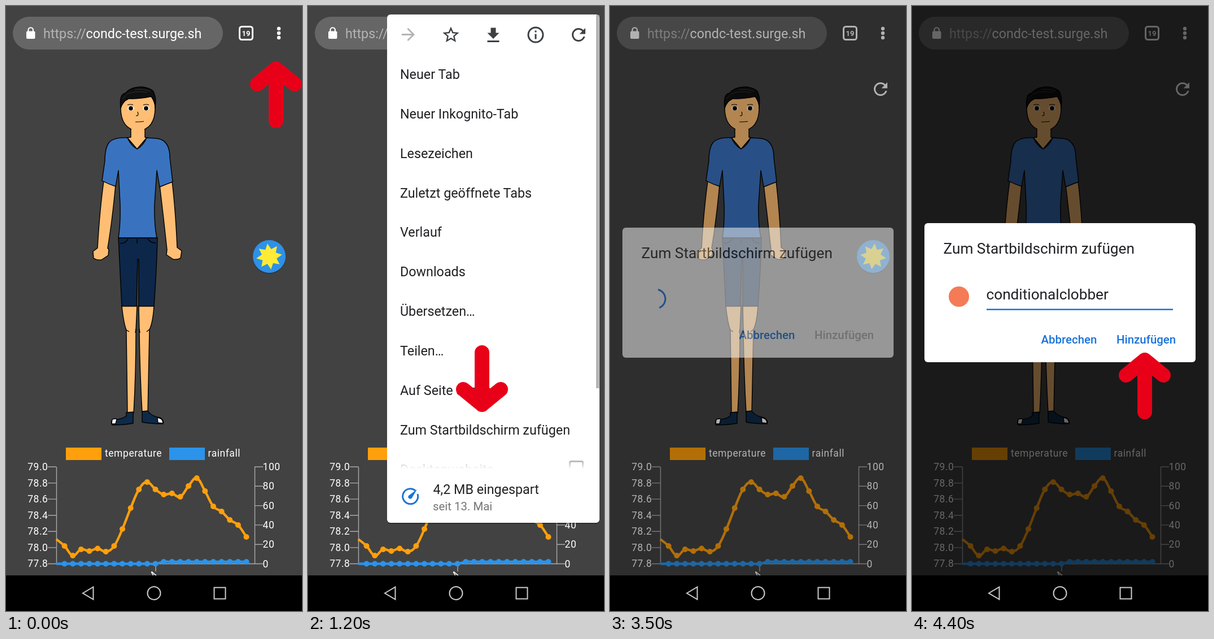
Recreate the animation shown at these times as an HTML page. Size 524 by 1070 pixels, loop 8 s.

```html
<!DOCTYPE html>
<html lang="de">
<head>
<meta charset="utf-8">
<title>Zum Startbildschirm zufügen</title>
<style>
html, body { margin: 0; width: 100%; height: 100%; overflow: hidden; background: #424242; }
svg { display: block; width: 100%; height: 100%; }
text { font: 23.3px Roboto, sans-serif; }
.dark { fill: #202124; }
.chart text { font-size: 17.5px; letter-spacing: .55px; fill: #fff; }
.title { font-size: 26.2px; }
.button { font-size: 20.4px; font-weight: 500; fill: #1a73d9; }
.body { stroke: #000; stroke-width: 1.4; stroke-linejoin: round; }
.skin { fill: #ffbe74; }
.nav { fill: none; stroke: #ccc; stroke-width: 2; }
.arrow { fill: none; stroke: #e80019; stroke-width: 26; stroke-linecap: round; stroke-linejoin: round; }
</style>
</head>
<body>
<svg viewBox="0 0 524 1070">
  <defs>
    <path id="reload" transform="scale(1.5) translate(-12 -12)" d="M17.65 6.35A7.96 7.96 0 0 0 12 4a8 8 0 1 0 7.73 10h-2.08A6 6 0 1 1 12 6c1.66 0 3.14.69 4.22 1.78L13 11h7V4z"/>
    <linearGradient id="fade" x2="0" y2="1">
      <stop stop-color="#fff" stop-opacity="0.3"/><stop offset="1" stop-color="#fff"/>
    </linearGradient>
  </defs>
  <rect width="524" height="1070" fill="#424242"/>

  <!-- address bar -->
  <rect x="12" y="19" width="372" height="58" rx="29" fill="#666"/>
  <rect x="36" y="44.5" width="15.500" height="13.500" rx="2" fill="#fff"/>
  <path d="M39.500 46v-3.500a4.250 4.250 0 0 1 8.500 0V46" fill="none" stroke="#fff" stroke-width="2.200"/>
  <text x="66" y="57" fill="#fff"><tspan fill="#b4b4b4">https://</tspan>condc-test.surge.sh</text>
  <rect x="413.500" y="36.500" width="23" height="23" rx="4" fill="none" stroke="#fff" stroke-width="3"/>
  <text x="425" y="52.500" text-anchor="middle" fill="#fff" style="font-size:13px;font-weight:700">19</text>
  <g fill="#fff"><circle cx="483" cy="40" r="3.200"/><circle cx="483" cy="48" r="3.200"/><circle cx="483" cy="56" r="3.200"/></g>
  <use href="#reload" x="479" y="147" fill="#fff"/>

  <!-- figure -->
  <g class="body">
    <g class="skin">
      <path d="M173 310Q166 360 162 428L154 434 155 446Q161 450 169 449L181 441 182 431 180 428Q188 380 194 316Z"/>
      <path d="M294 310Q300 360 303 427L311 433 309 446Q303 449 296 448L284 440 285 431Q279 375 272 316Z"/>
      <path d="M205 530Q208 560 213 573L215 720H226Q230 650 230 573L232 530Z"/>
      <path d="M235 530L236 575Q237 650 241 719H251L254 572Q260 560 262 530Z"/>
      <path d="M213 573l5 3M230 571l-1 7M236 571l1 7M254 572l-5 4" fill="none"/>
      <path d="M221 212V232L215 233 232 253 249 233 246 232V212Z"/>
      <path d="M203 176C202 205 214 220 234 220S265 204 264 176Q258 150 234 150T203 176Z"/>
      <path d="M222 217H245V224H222Z" stroke="none"/>
    </g>
    <path d="M199 410L205 531H231L233 448H235V531H262Q267 460 268 410Z" fill="#0c274a"/>
    <path d="M202 420q10 0 14-8M265 419q-9 0-14-7M232 412v8" fill="none"/>
    <path d="M215 233Q190 232 182 242 175 252 175 274L170 309Q181 315 194 319L199 291 202 350Q203 385 199 410H267Q262 385 263 350L267 291 272 320Q284 315 295 311L290 268Q290 235 264 234L249 233Q243 247 232 253 221 247 215 233Z" fill="#3973bf"/>
    <path d="M213 719l12-1v20q-14 3-37 3-3-4 0-9 18-1 25-7z" fill="#0e2a47"/>
    <path d="M241 717l10-1q5 9 22 12 7 4 5 11-20 0-37-3z" fill="#0e2a47"/>
    <path d="M188 731q7-2 8 0l-2 8h-7z" fill="#fff"/>
    <path d="M268 728q10 1 10 10l-9-1z" fill="#fff"/>
    <path d="M203 181Q200 155 212 154 219 144 239 143 262 145 263 157 266 163 264 181 264 168 258 160 234 165 217 164 206 169 203 181Z" fill="#101010"/>
    <path d="M213 156q16-7 37-3M228 148q17-2 27 3M206 165l6-7" fill="none" stroke="#333" stroke-width="1"/>
    <path d="M215 175q6-2 10 0M243 175q6-2 10 0M233 187q3 8-3 7M229 205q10 0 15-1" fill="none" stroke-width="1.2"/>
  </g>
  <g fill="#fff"><ellipse cx="221" cy="181" rx="6" ry="4"/><ellipse cx="248" cy="181" rx="6" ry="4"/></g>
  <circle cx="221" cy="181" r="3.800"/><circle cx="248" cy="181" r="3.800"/>

  <circle cx="466" cy="444.500" r="29" opacity=".3"/>
  <circle cx="466" cy="443" r="29" fill="#2e91e8"/>
  <path id="sun" fill="#ffeb35"/>

  <g class="chart" id="chart">
    <rect x="106" y="781" width="63" height="22" fill="#ff9f0c"/>
    <rect x="289" y="781" width="63" height="22" fill="#2b93ea"/>
    <text x="175" y="797">temperature</text>
    <text x="357.500" y="797">rainfall</text>
    <text transform="translate(269 1006) rotate(-50)" text-anchor="end">M</text>
  </g>

  <rect id="dim" width="524" height="1070"/>

  <g id="menu">
    <rect x="140" y="17" width="376" height="899" rx="6" opacity=".3"/>
    <rect x="140" y="15" width="376" height="899" rx="6" fill="#fff"/>
    <g fill="#3c4043">
      <path transform="translate(160 33) scale(1.455)" fill="#b4b4b4" d="M12 4l-1.410 1.410L16.170 11H4v2h12.170l-5.580 5.590L12 20l8-8z"/>
      <path transform="translate(235.500 33.500) scale(1.455)" d="M22 9.240l-7.190-.62L12 2 9.190 8.630 2 9.240l5.460 4.730L5.820 21 12 17.270 18.180 21l-1.630-7.030zM12 15.400l-3.760 2.270 1-4.280-3.320-2.880 4.380-.38L12 6.100l1.710 4.040 4.380.38-3.320 2.880 1 4.280z"/>
      <path transform="translate(310 34) scale(1.500)" d="M19 9h-4V3H9v6H5l7 7 7-7zM5 18v2h14v-2z"/>
      <circle cx="403" cy="51" r="13" fill="none" stroke="#3c4043" stroke-width="3"/>
      <path d="M401.500 43.500h3v3h-3zM401.500 49.500h3v9h-3z"/>
      <use href="#reload" x="479" y="51"/>
    </g>
    <g id="items" class="dark"></g>
    <rect x="463.500" y="805.500" width="23" height="23" rx="2" fill="none" stroke="#777" stroke-width="3"/>
    <rect x="145" y="800" width="366" height="19" fill="url(#fade)"/>
    <rect x="145" y="818" width="366" height="90" fill="#fff"/>
    <path d="M190 857A13.500 13.500 0 1 0 194 863" fill="none" stroke="#1a73d9" stroke-width="3"/>
    <path d="M193 855L184 870A3.500 3.500 0 1 1 178 866Z" fill="#1a73d9"/>
    <text x="221.500" y="863" class="dark">4,2 MB eingespart</text>
    <text x="221" y="892" style="font-size:20.4px" fill="#757575">seit 13. Mai</text>
    <rect id="bar" x="510" y="16" width="5.500" height="660" fill="#b3b3b3"/>
  </g>

  <g id="dialog">
    <rect id="panel" x="22" width="480" rx="6" fill="#fff"/>
    <text id="title" class="title dark" x="55.500">Zum Startbildschirm zufügen</text>
    <path id="spinner" fill="none" stroke="#1a73e8" stroke-width="3"/>
    <g id="form">
      <circle cx="83" cy="514" r="18" fill="#f47b55"/>
      <text class="title dark" x="131.500" y="519">conditionalclobber</text>
      <rect x="132" y="535.500" width="330" height="2.500" fill="#1a73d9"/>
      <rect id="caret" x="131" y="492" width="2.500" height="34" fill="#1a73d9"/>
    </g>
    <g id="buttons">
      <text class="button" x="228.500">Abbrechen</text>
      <text class="button" id="add" x="362">Hinzufügen</text>
    </g>
  </g>

  <rect y="1007" width="524" height="63"/>
  <g class="nav">
    <path d="M136 1038.500L154.500 1027.500V1049.500Z"/>
    <circle cx="262" cy="1038.500" r="11.500"/>
    <rect x="368.500" y="1028.500" width="20" height="20"/>
  </g>

  <path id="arrow" class="arrow" d="M0 13V105M-33 40L0 13 33 40"/>
  <g id="touch">
    <circle r="13" fill="#fff" opacity=".2"/>
    <circle r="15" fill="none" stroke="#787b84" stroke-opacity=".35" stroke-width="4"/>
  </g>
</svg>
<script>
const $ = id => document.getElementById(id);

function add(parent, tag, attrs, text = '') {
  const el = document.createElementNS('http://www.w3.org/2000/svg', tag);
  for (const k in attrs) el.setAttribute(k, attrs[k]);
  el.textContent = text;
  parent.append(el);
}

const set = (id, attrs) => { for (const k in attrs) $(id).setAttribute(k, attrs[k]); };
const show = (id, alpha) => set(id, { opacity: Number(alpha) });
const polar = (x, y, r, deg) => {
  const a = deg * Math.PI / 180;
  return [x + r * Math.cos(a), y + r * Math.sin(a)];
};

function drawAxes() {
  let d = 'M89.500 815V987M440.500 815V987M89 986.500H441M265 986V1000';
  for (let i = 0; i < 7; i++) {
    const y = 815 + i * 28.58;
    d += `M74 ${y}H89`;
    add($('chart'), 'text', { x: 74.5, y: y + 6, 'text-anchor': 'end' }, (79 - i * .2).toFixed(1));
  }
  for (let i = 0; i < 6; i++) {
    const y = 815 + i * 34.3;
    d += `M440 ${y}H455`;
    add($('chart'), 'text', { x: 454.5, y: y + 6 }, 100 - i * 20);
  }
  add($('chart'), 'path', { d, stroke: '#aaa', 'stroke-width': 1.4, fill: 'none' });
}

function drawSeries(ys, color) {
  const p = ys.map((y, i) => [89 + i * 14.63, y]);
  const at = i => p[Math.max(0, Math.min(p.length - 1, i))];
  const handle = (i, s) => at(i).map((v, k) => v + s * .2 * (at(i + 1)[k] - at(i - 1)[k]));
  let d = 'M' + p[0];
  for (let i = 1; i < p.length; i++) d += `C${handle(i - 1, 1)} ${handle(i, -1)} ${p[i]}`;
  add($('chart'), 'path', { d, stroke: color, 'stroke-width': 4.3, fill: 'none' });
  p.slice(1).forEach(([cx, cy]) => add($('chart'), 'circle', { cx, cy, r: 5, fill: color }));
}

drawAxes();
drawSeries([943, 955, 972, 961, 964, 959.5, 965, 955, 925, 888, 855, 842, 855, 864, 862, 868,
  849, 835, 858, 885, 894, 909, 918, 939], '#ff9f0c');
drawSeries(Array.from({ length: 24 }, (_, i) => i < 13 ? 986.5 : 983), '#2b93ea');

['Neuer Tab', 'Neuer Inkognito-Tab', 'Lesezeichen', 'Zuletzt geöffnete Tabs', 'Verlauf', 'Downloads',
  'Übersetzen…', 'Teilen…', 'Auf Seite suchen', 'Zum Startbildschirm zufügen', 'Desktopwebsite']
  .forEach((label, i) => add($('items'), 'text', { x: 163, y: 129 + i * 69.85, opacity: i < 10 ? 1 : .6 }, label));

function drawSun(turn) {
  const pts = Array.from({ length: 16 }, (_, i) => polar(466, 443, i % 2 ? 13.5 : 23, turn + i * 22.5));
  set('sun', { d: 'M' + pts.join('L') + 'Z' });
}

function drawMenu(t) {
  const open = t < 3300 ? Math.max(0, Math.min(1, (t - 700) / 300)) : t < 3400 ? .5 : 0;
  const size = t < 3200 ? .7 + .3 * open : 1;
  set('menu', { opacity: open, transform: `translate(516 15) scale(${size}) translate(-516 -15)` });
  show('bar', t >= 1000 && t < 3200);
}

function drawDialog(t) {
  const alpha = t < 3500 ? 0 : t < 3600 ? .5 : 1;
  const ready = t >= 4100;
  const grow = ready ? 8 : 0;
  show('dim', alpha * .6);
  show('dialog', alpha);
  set('panel', { y: 392 - grow, height: 230 + 2 * grow });
  set('title', { y: 446 - grow });
  set('buttons', { transform: `translate(0 ${589 + grow})` });
  set('add', { style: ready ? '' : 'fill:#b4b4b4' });
  show('form', ready);
  show('caret', t < 4400);
  show('spinner', !ready);
  const start = -49 + (t - 3600) * .27;
  set('spinner', { d: `M${polar(81, 518, 17, start)}A17 17 0 0 1 ${polar(81, 518, 17, start + 144)}` });
}

function drawPointers(t) {
  const pose = t < 500 ? 'translate(478 98)'
    : t >= 1200 && t < 3200 ? 'translate(308 718) scale(1 -1)'
    : t >= 4400 ? 'translate(412 613)' : '';
  set('arrow', { transform: pose, opacity: pose ? 1 : 0 });
  const first = t >= 600 && t < 900;
  set('touch', {
    transform: first ? 'translate(507 45)' : 'translate(291 744)',
    opacity: first || t >= 3200 && t < 3500 ? 1 : 0
  });
}

function frame(now) {
  const t = Math.floor(now % 8000 / 100) * 100;
  drawSun(t < 500 ? -8 : -8 + (t - 500) * .05);
  drawMenu(t);
  drawDialog(t);
  drawPointers(t);
  requestAnimationFrame(frame);
}
frame(performance.now());
</script>
</body>
</html>
```
